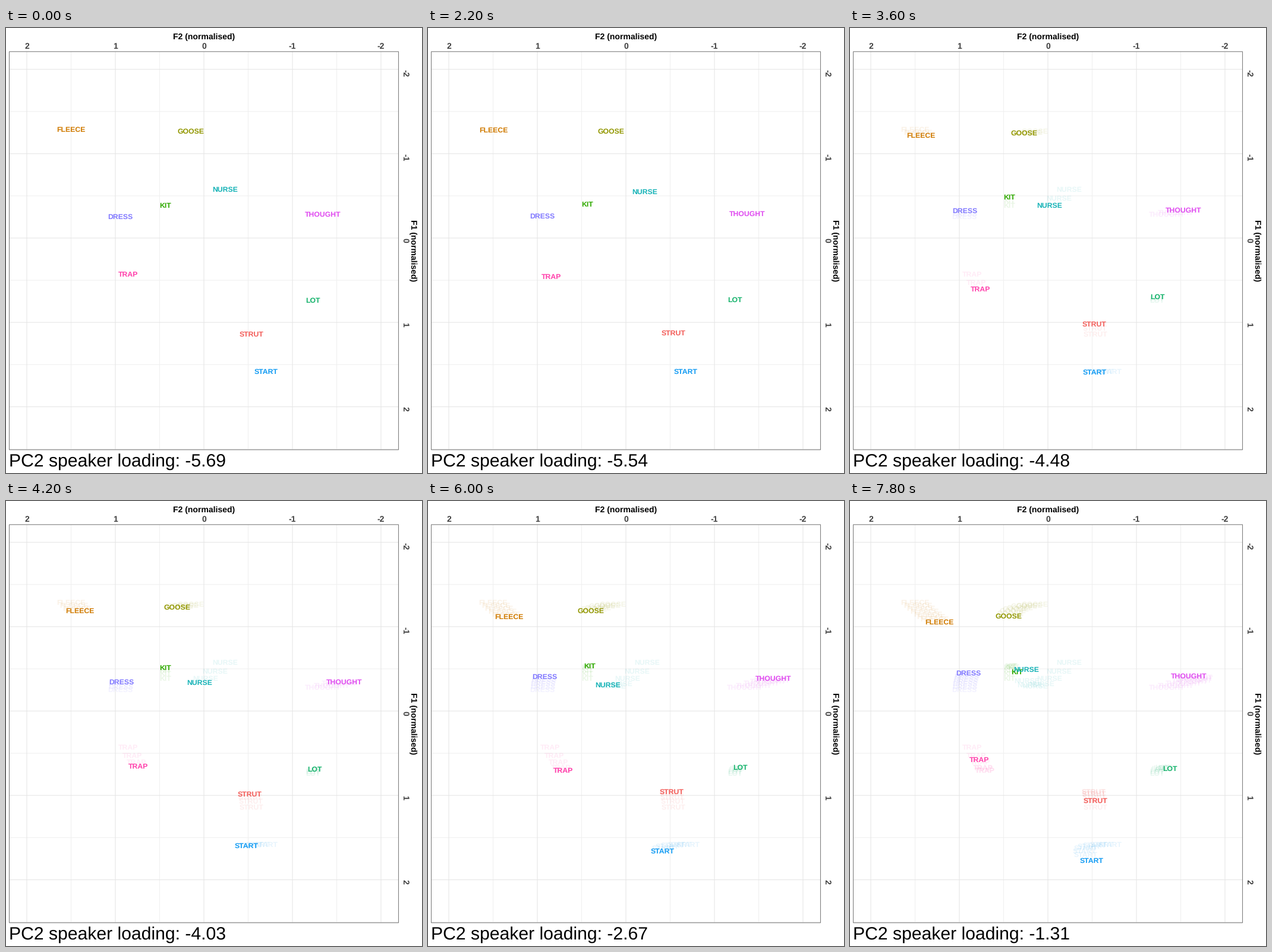
These frames come from a looping animation (700x750 px, 8 s). A matplotlib script:

```python
import matplotlib.pyplot as plt
from matplotlib.animation import FuncAnimation

W, H, DPI = 700, 750, 100
FRAMES, INTERVAL = 40, 200
PAUSE = 10      # frames held before the words move
STEP = 4        # frames between two marks of a trail
LAG = 2         # frames before a mark shows

LEFT, RIGHT, TOP, BOTTOM = 5.5, 660.5, 39.8, 710.8
X0, Y0 = 333, 354       # where both scales read zero
DX, DY = 149, 142.2     # one unit of each scale

plt.rcParams["font.family"] = "Liberation Sans"
plt.rcParams["text.hinting"] = "none"

# word: colour, start, shift over the whole run, sideways bend
WORDS = {
    "DRESS": ("#8179ff", (192.5, 317.5), (6.5, -28), (-1, -2.8)),
    "FLEECE": ("#d07b00", (109, 170.5), (41, 33), (-0.7, 1.5)),
    "GOOSE": ("#929700", (310.5, 173.5), (-44, 20), (-7, -3)),
    "KIT": ("#2fa900", (268, 298.5), (13, -11), (-5.2, -14.9)),
    "LOT": ("#14b26b", (516, 458.5), (22, -8), (-5.8, -4.7)),
    "NURSE": ("#17b3b7", (368.5, 271.5), (-71.5, 12), (-17.5, 32.6)),
    "START": ("#149cf3", (437.5, 578.5), (-31, 27), (-23.3, -8.8)),
    "STRUT": ("#f35e5a", (413.5, 515.5), (-0.5, -11), (-3.5, -20)),
    "THOUGHT": ("#e04df0", (533, 313.5), (37, -19), (25, -2)),
    "TRAP": ("#ff42ac", (205.5, 414.5), (12.5, 21), (14.2, 27)),
}

fig = plt.figure(figsize=(W / DPI, H / DPI), dpi=DPI, facecolor="white")
ax = fig.add_axes([0, 0, 1, 1])
ax.set(xlim=(0, W), ylim=(H, 0))
ax.axis("off")


def px(size):
    return size * 72 / DPI


def label(x, y, text, size, color="black", weight="bold", ha="center",
          va="baseline", **kw):
    return ax.text(x, y, text, fontsize=px(size), color=color, weight=weight,
                   ha=ha, va=va, **kw)


def line(xs, ys, color, z):
    ax.plot(xs, ys, color=color, lw=px(1.1), zorder=z, snap=False,
            solid_capstyle="butt", solid_joinstyle="miter")


def draw_panel():
    for half in range(-4, 6):
        value = half / 2
        x, y = X0 - value * DX, Y0 + value * DY
        major = half % 2 == 0
        color = "#e6e6e6" if major else "#f0f0f0"
        if x > LEFT and half < 5:
            line([x, x], [TOP, BOTTOM], color, major)
        line([LEFT, RIGHT], [y, y], color, major)
        if major:
            label(x, 35, f"{value:.0f}", 14, "#404040")
            label(670.7, y, f"{value:.0f}", 14, "#404040", rotation=270,
                  va="top")
    line([LEFT, RIGHT, RIGHT, LEFT, LEFT], [TOP, TOP, BOTTOM, BOTTOM, TOP],
         "#7f7f7f", 2)
    label(X0, 19, "F2 (normalised)", 14)
    label(684.7, 375.5, "F1 (normalised)", 14, rotation=270, va="center")


def place(word, frame):
    """Even drift from start to end plus an arch that peaks a little late."""
    _, start, shift, bend = WORDS[word]
    u = max(frame - PAUSE, 0) / (FRAMES - 1 - PAUSE)
    arch = 4 * u * (1 - u) * (0.8 + 0.4 * u)
    x, y = (s + d * u + b * arch for s, d, b in zip(start, shift, bend))
    return x, y + 4.5


draw_panel()
movers, marks = {}, []
for word, (color, *_) in WORDS.items():
    for t in range(PAUSE, FRAMES - LAG, STEP):
        mark = label(*place(word, t), word, 12.2, color, alpha=0.1, zorder=4)
        marks.append((t + LAG, mark))
    movers[word] = label(0, 0, word, 12.2, color, zorder=5)
counter = label(5, 739, "", 30.1, weight="normal", ha="left")


def update(frame):
    for word, text in movers.items():
        text.set_position(place(word, frame))
    for start, mark in marks:
        mark.set_visible(frame >= start)
    loading = -5.694 + 0.15125 * max(frame - PAUSE, 0)
    counter.set_text(f"PC2 speaker loading: {loading:.2f}")
    return []


anim = FuncAnimation(fig, update, frames=FRAMES, interval=INTERVAL,
                     init_func=lambda: update(0), repeat=True, repeat_delay=0)
plt.show()
```
